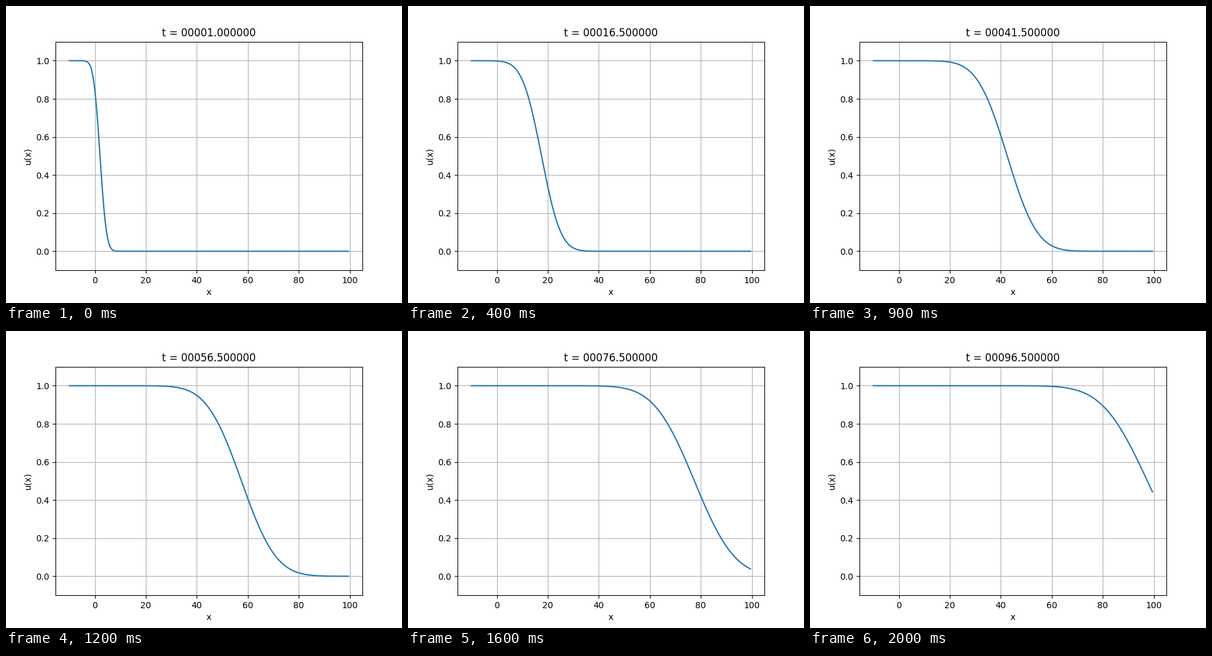
A matplotlib script that plays this animation: 640x480 px, repeating every 2100 ms.

```python
import math

import matplotlib.pyplot as plt
import numpy as np
from matplotlib.animation import FuncAnimation

FRAMES = 21
INTERVAL = 100  # ms

x = np.arange(-10, 100, 0.5)
erfc = np.vectorize(math.erfc)


def time_at(frame):
    """Simulation time: a short first step, then steps of 5."""
    return 1.0 if frame == 0 else 5 * frame - 3.5


def front(t):
    """Step profile carried at unit speed with unit diffusivity."""
    age = t + 1
    return 0.5 * erfc((x - age) / (2 * math.sqrt(age)))


fig, ax = plt.subplots(figsize=(6.4, 4.8), dpi=100)
line, = ax.plot(x, front(time_at(0)))
ax.set_ylim(-0.1, 1.1)
ax.set_xlabel("x")
ax.set_ylabel("u(x)")
ax.grid(True)
title = ax.set_title("")


def update(frame):
    t = time_at(frame)
    line.set_ydata(front(t))
    title.set_text(f"t = {t:012.6f}")
    return line, title


anim = FuncAnimation(fig, update, frames=FRAMES, interval=INTERVAL,
                     repeat=True, repeat_delay=0, blit=False)
plt.show()
```
